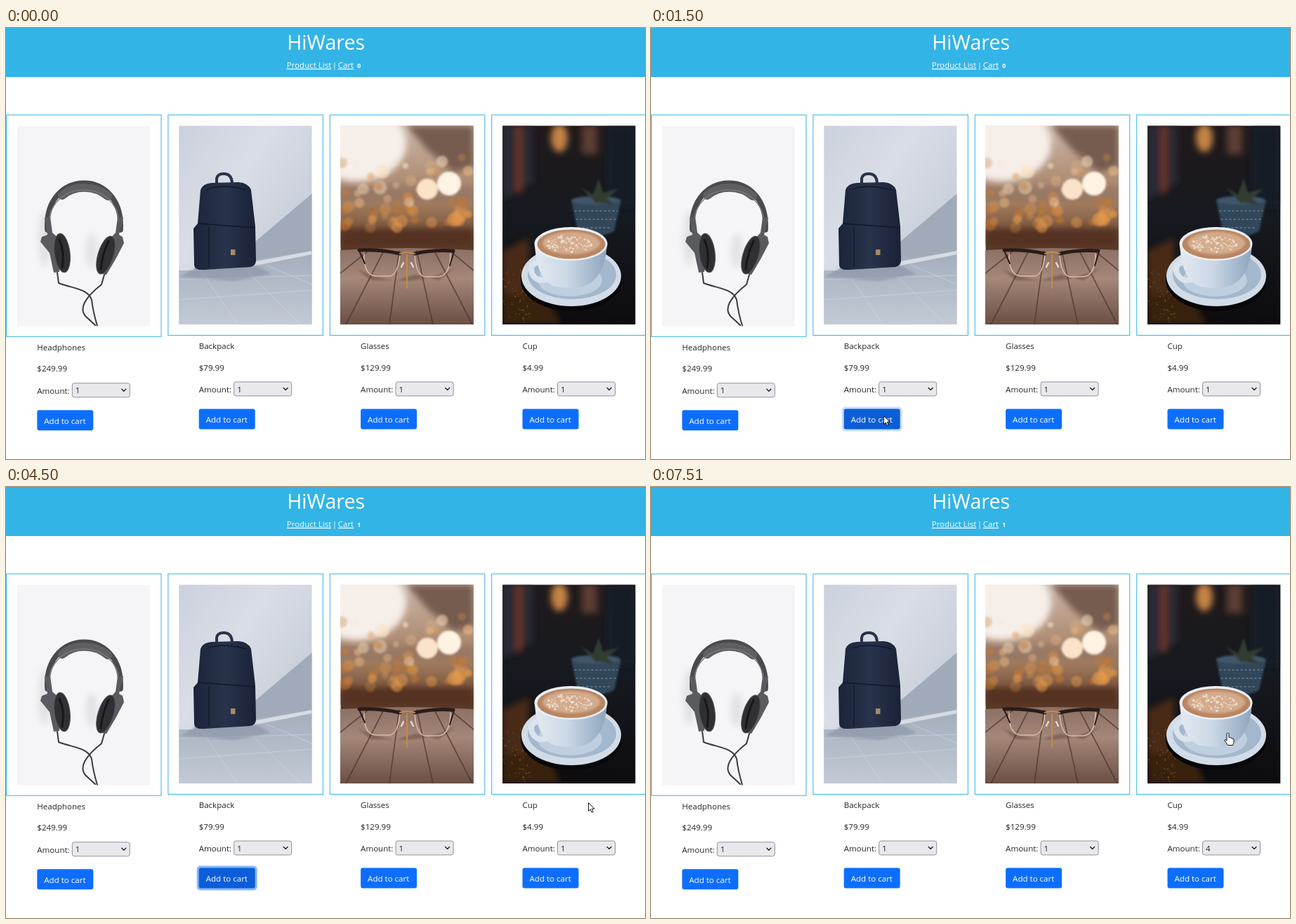
Write an HTML page that moves like this. It is 910 px wide and 615 px high and loops after 8000 ms.

```html
<!DOCTYPE html>
<html lang="en">
<head>
<meta charset="utf-8">
<title>HiWares</title>
<style>
  html, body { margin: 0; width: 100%; height: 100%; overflow: hidden; background: #fff; }
  svg { display: block; width: 910px; height: 615px; }
  text { font: 11.55px "Open Sans", "Noto Sans", sans-serif; fill: #212529; white-space: pre; }
  .head text { fill: #fff; }
  .head .title { font-size: 28.6px; }
  .head .count { font-size: 8.6px; font-weight: 700; }
  .link { text-decoration: underline; }
  .button { fill: #0d6efd; }
  .label { fill: #fff; }
  .dialog text { font-size: 8.7px; fill: #fbfbfe; }
  .dialog .strong { font-size: 8.5px; font-weight: 600; }
  .line { fill: none; stroke-linecap: round; stroke-linejoin: round; }
</style>
</head>
<body>
<svg id="stage" viewBox="0 0 910 615">
  <defs>
    <filter id="soft" x="-50%" y="-50%" width="200%" height="200%"><feGaussianBlur stdDeviation="5"/></filter>
    <filter id="slight" x="-50%" y="-50%" width="200%" height="200%"><feGaussianBlur stdDeviation="1.6"/></filter>
    <linearGradient id="wall" x2="1" y2="1"><stop stop-color="#cbd1dc"/><stop offset=".35" stop-color="#d9dde6"/><stop offset="1" stop-color="#bbc3d0"/></linearGradient>
    <linearGradient id="floor" x2="0" y2="1"><stop stop-color="#a3adbc"/><stop offset="1" stop-color="#c3cad5"/></linearGradient>
    <linearGradient id="fabric"><stop stop-color="#1b2439"/><stop offset=".5" stop-color="#28334c"/><stop offset="1" stop-color="#1a2236"/></linearGradient>
    <linearGradient id="dusk" x2="0" y2="1"><stop stop-color="#cdb7a8"/><stop offset=".4" stop-color="#a07a5c"/><stop offset=".62" stop-color="#5b3a28"/></linearGradient>
    <linearGradient id="deck" x2="0" y2="1"><stop stop-color="#8c7065"/><stop offset=".4" stop-color="#a58779"/><stop offset="1" stop-color="#6a4f45"/></linearGradient>
    <linearGradient id="night" x2="0" y2="1"><stop stop-color="#20191b"/><stop offset=".45" stop-color="#161a20"/><stop offset="1" stop-color="#0d0b0d"/></linearGradient>
    <linearGradient id="china"><stop stop-color="#e3e9f0"/><stop offset=".45" stop-color="#cbd8e6"/><stop offset="1" stop-color="#8ea4bd"/></linearGradient>
  </defs>

  <g class="head">
    <rect width="910" height="70" fill="#33b4e6"/>
    <text class="title" x="455.7" y="31" text-anchor="middle">HiWares</text>
    <text class="link" x="399.7" y="57">Product List</text>
    <text x="468" y="57" text-anchor="middle">|</text>
    <text class="link" x="472.7" y="57">Cart</text>
    <text class="count" id="count" x="500.3" y="57"></text>
  </g>
  <g id="cards"></g>

  <svg x="16" y="140" width="189" height="285.5" viewBox="16 140 189 285.5">
    <rect x="16" y="140" width="189" height="286" fill="#f5f5f7"/>
    <g filter="url(#soft)" fill="#d8d9dd" opacity=".7"><ellipse cx="55" cy="300" rx="9" ry="40"/><ellipse cx="122" cy="318" rx="8" ry="25"/></g>
    <g class="line">
      <path d="M59 288C53 200 168 198 163 288" stroke="#4a4a4e" stroke-width="7.500"/>
      <path d="M80 239C98 224 126 224 145 240" stroke="#5f5f63" stroke-width="12"/>
      <path d="M61 282C60 214 162 214 161 282" stroke="#77777b" stroke-width="1.500"/>
      <path d="M73 349L75 364C96 372 117 372 122 388Q124 405 130 425M140 352L136 366C112 385 104 400 113 411L127 424" stroke="#3a3a3e" stroke-width="2"/>
    </g>
    <path d="M55 270h8l3 22 9 8 1 48-8 1-6-28-13-16 2-7 8-3z" fill="#5a5b60"/>
    <path d="M167 270h-8l-3 22-8 9 2 24-13 26 6 1 13-22 12-23-2-9-5-3z" fill="#5a5b60"/>
    <g fill="#303034" stroke="#505056"><ellipse cx="80" cy="321" rx="11" ry="28" transform="rotate(-7 80 321)"/><ellipse cx="142" cy="324" rx="11" ry="28" transform="rotate(17 142 324)"/></g>
    <g class="line" stroke="#17171a" stroke-width="3"><path d="M76 302Q84 319 80 342M146 304Q137 323 135 344"/></g>
  </svg>

  <svg x="246.3" y="139.5" width="189.2" height="283.5" viewBox="246.3 139.5 189.2 283.5">
    <rect x="246" y="139" width="190" height="284" fill="url(#wall)"/>
    <path d="M436 236L350 309V338L436 322Z" fill="#a1aab9"/>
    <path d="M246 346L436 318V423H246Z" fill="url(#floor)"/>
    <path d="M246 338L268 337V346H246ZM350 334L436 318V323L350 340Z" fill="#d7dce4"/>
    <path class="line" d="M246 359L436 353M246 388L436 374M276 344L330 423M340 344L420 423M370 338L436 366" stroke="#dce0e7" opacity=".45"/>
    <path d="M270 342L356 339L378 351L325 361L248 355Z" fill="#7e899c" opacity=".5" filter="url(#slight)"/>
    <path class="line" d="M300 224V215Q301 208 310 208Q322 208 322 223" stroke="#283248" stroke-width="4"/>
    <path d="M277 231Q280 222 293 221L331 220Q345 221 349 231L355 283 356 332Q356 339 348 341L282 345Q268 346 268 338L267 286 273 279Z" fill="url(#fabric)"/>
    <path class="line" d="M274 279L354 285M287 230Q310 222 342 231M289 284V341" stroke="#111829" stroke-width="1.3"/>
    <rect x="320" y="316" width="6.5" height="8" fill="#a58a64"/>
  </svg>

  <svg x="476.7" y="139.5" width="189.2" height="283.5" viewBox="476.7 139.5 189.2 283.5">
    <rect x="476" y="139" width="190" height="284" fill="url(#dusk)"/>
    <g filter="url(#soft)">
      <ellipse cx="500" cy="165" rx="70" ry="54" fill="#f5eee9"/>
      <path d="M570 139H666V198L638 206 600 174Z" fill="#765b4f"/>
      <path d="M476 225H666V248H476Z" fill="#8f7467" opacity=".6"/>
      <path d="M476 286H666V312H476Z" fill="#543321"/>
    </g>
    <g id="bokeh" filter="url(#slight)"></g>
    <path d="M476 317Q570 311 666 317V423H476Z" fill="url(#deck)"/>
    <path class="line" d="M516 318L476 350M538 318L484 423M560 318L546 423M585 318L608 423M610 318L664 423M632 318L666 346" stroke="#4c342d" stroke-width="1.7" opacity=".7"/>
    <path d="M500 344Q570 378 640 342L616 360 584 352 556 360 520 360Z" fill="#49322b" opacity=".4" filter="url(#slight)"/>
    <g class="line" stroke="#2b1c19">
      <path d="M510 322Q509 352 526 354H546Q558 353 561 324M582 324Q584 353 597 355H616Q633 353 633 322" stroke="#d8bda7" stroke-width="1.5"/>
      <path d="M503 317Q534 316 561 322M582 322Q608 316 637 318" stroke-width="5"/>
      <path d="M503 318L511 336M638 319L632 339" stroke-width="2"/>
      <path d="M561 322Q571 318 582 322M571 324V371" stroke="#c58b46" stroke-width="2"/>
      <path d="M563 341L566 335M580 341L577 335" stroke="#e5d6ca" stroke-width="2.5"/>
    </g>
  </svg>

  <svg x="707.1" y="139.5" width="189.2" height="283.5" viewBox="707.1 139.5 189.2 283.5">
    <rect x="707" y="139" width="190" height="284" fill="url(#night)"/>
    <g filter="url(#soft)">
      <path d="M707 139H750V220L707 245Z" fill="#2a2b35"/>
      <path d="M726 139H735V235H726Z" fill="#6b3524"/>
      <ellipse cx="788" cy="157" rx="12" ry="20" fill="#c58345"/>
      <path d="M820 139H842V180H820Z" fill="#5c3c30"/>
      <path d="M855 139H897V255H855Z" fill="#171b26"/>
      <path d="M707 318L745 300 745 423H707Z" fill="#4a2a12"/>
      <path d="M707 380H770L790 423H707Z" fill="#38210f"/>
    </g>
    <g id="grain" fill="#a26c36"></g>
    <g filter="url(#slight)">
      <path d="M805 246H876L866 290Q840 303 814 289Z" fill="#33475a"/>
      <ellipse cx="840" cy="246" rx="35" ry="6" fill="#41566a"/>
      <path d="M840 250L818 227 836 238 844 215 850 235 873 229 856 243 868 253 844 249 822 254Z" fill="#313c31"/>
    </g>
    <path class="line" d="M810 261H871M812 273H868M815 285H863" stroke="#7c90a2" stroke-width="1.6" stroke-dasharray="2 4" opacity=".7"/>
    <ellipse cx="805" cy="360" rx="72" ry="44" fill="#070709"/>
    <ellipse cx="805" cy="354" rx="71" ry="43" fill="#d2dce7"/>
    <ellipse cx="806" cy="352" rx="63" ry="35" fill="#a3b7cd"/>
    <ellipse cx="803" cy="360" rx="46" ry="23" fill="#bfcfdf"/>
    <path class="line" d="M764 334Q744 334 749 350Q758 368 779 354" stroke="#dbe4ed" stroke-width="8"/>
    <path d="M753 309Q756 362 783 369Q808 374 827 367Q853 354 856 309Z" fill="url(#china)"/>
    <ellipse cx="804.500" cy="308" rx="52" ry="24" fill="#eaf0f5"/>
    <ellipse cx="805" cy="308.500" rx="48.500" ry="21" fill="#b98562"/>
    <ellipse cx="805" cy="307" rx="41" ry="16" fill="#d3ab8c" filter="url(#slight)"/>
    <g id="foam" fill="#f3e6d9"></g>
  </svg>

  <g id="modal">
    <rect width="910" height="615" fill="#1c1b22" opacity=".45"/>
    <g class="dialog">
      <rect x="300" y="293" width="312" height="101" rx="7" opacity=".45" filter="url(#slight)"/>
      <rect x="300.500" y="292" width="311" height="99.500" rx="5" fill="#42414d"/>
      <path class="line" d="M313.800 310.500a5.300 5.300 0 1 0 10.600 0a5.300 5.300 0 1 0-10.600 0h10.600M319.100 305.200q-5 5.300 0 10.600q5-5.300 0-10.600" stroke="#fbfbfe" stroke-width="1.200"/>
      <text class="strong" x="328" y="314">localhost:4200</text>
      <text x="313" y="340.500">Added to cart.</text>
      <rect id="ok" x="563" y="355" width="36.700" height="24.500" rx="3"/>
      <circle id="press" cx="581" cy="368" r="9" fill="#e4ec28" opacity=".75"/>
      <text class="strong" x="581.200" y="371" text-anchor="middle" style="fill:#2b2a33">OK</text>
    </g>
  </g>

  <g id="list"></g>
  <g stroke="#111" stroke-linejoin="round" fill="#fff">
    <path id="arrow" d="M.5.5V12.500L3.300 10 5.200 14.300 7.200 13.400 5.400 9.200H9Z"/>
    <path id="hand" d="M3 11V1.800Q3-.2 4.600 0T6 1.800V6.500Q8 5.500 8.800 7.300Q10.500 6.500 11 8.200Q13 7.500 13 9.800V13Q12.500 15.500 11.500 17.500H4.700Q2 14 .2 10.800Q0 8.800 1.500 9.300Z"/>
  </g>
</svg>

<script>
const $ = id => document.getElementById(id);
const show = (id, on) => $(id).style.display = on ? '' : 'none';
const place = (id, [x, y]) => $(id).setAttribute('transform', `translate(${x} ${y})`);

let seed = 7;
const random = () => (seed = seed * 16807 % 2147483647) / 2147483647;
const range = (a, b) => a + random() * (b - a);
const repeat = (n, make) => Array.from({ length: n }, (_, i) => make(i)).join('');

const products = [['Headphones', 249.99], ['Backpack', 79.99], ['Glasses', 129.99], ['Cup', 4.99]];
const PITCH = 230.4;

$('cards').innerHTML = products.map(([name, price], i) => {
  const x = PITCH * i, dy = i ? 0 : 1.8;
  return `
    <rect x="${x + .5}" y="124" width="220.5" height="${314.5 + dy}" fill="none" stroke="#33b4e6"/>
    <g transform="translate(${x + 44.3} ${dy})">
      <text y="458">${name}</text>
      <text y="488.500">$${price}</text>
      <text y="520">Amount:</text>
      <rect x="50" y="505" width="82" height="20" rx="3" fill="#e9e9ed" stroke="#8f8f9d"/>
      <text id="amount${i}" x="54.500" y="519.500">1</text>
      <path class="line" d="M120.500 513.500l3 3 3-3" stroke="#222" stroke-width="1.400"/>
      <rect id="ring${i}" x="-3" y="540.500" width="86" height="35" rx="5" fill="#86b7fe" style="display:none"/>
      <rect id="button${i}" class="button" y="543.500" width="80" height="29" rx="3"/>
      <text class="label" x="10" y="563">Add to cart</text>
    </g>`;
}).join('');

const lights = ['#e59a4c', '#fbe3c4', '#c9792f', '#f3c08a'];
$('bokeh').innerHTML = repeat(60, i => {
  const y = range(185, 285);
  return `<circle cx="${range(478, 664)}" cy="${y}" r="${range(4, 10)}"
    fill="${lights[y > 250 ? i % 2 * 2 : i % 4]}" opacity="${range(.2, .65)}"/>`;
}) + '<circle cx="631" cy="222" r="17" fill="#fff3e4"/><circle cx="600" cy="230" r="15" fill="#fbe3ca"/>';

$('grain').innerHTML = repeat(90, () =>
  `<circle cx="${range(707, 748)}" cy="${range(345, 423)}" r="${range(.4, 1)}" opacity="${range(.2, .7)}"/>`);

$('foam').innerHTML = repeat(110, () => {
  const angle = range(0, 2 * Math.PI), d = Math.sqrt(random());
  return `<circle cx="${803 + 34 * d * Math.cos(angle)}" cy="${308 + 12 * d * Math.sin(angle)}"
    r="${range(.5, 1.8)}" opacity="${range(.3, .9)}"/>`;
});

const ROW = 24, LIST_Y = 259;
$('list').innerHTML = `
  <rect x="787" y="257" width="82" height="248" rx="2" opacity=".2" filter="url(#slight)"/>
  <rect x="785.500" y="255.500" width="81" height="248" fill="#fff" stroke="#c4c4cc"/>
  <rect id="hover" x="786" width="80" height="${ROW}" fill="#0078d7"/>` +
  repeat(10, i => `<text id="option${i}" x="791" y="${LIST_Y + ROW * i + 16}">${i + 1}</text>`);

const BLUE = '#0d6efd', DARK = '#0b5ed7';
const steps = [
  { at: 0 },
  { at: 500, arrow: [369, 542] },
  { at: 1500, arrow: [331, 553], fill: DARK, ring: .45 },
  { at: 2500, arrow: [484, 424], fill: DARK, modal: true },
  { at: 3500, arrow: [582, 368], fill: DARK, modal: true, press: true },
  { at: 4500, arrow: [829, 450], fill: DARK, ring: 1, count: 1 },
  { at: 5510, arrow: [838, 509], fill: '#0c67ec', count: 1, option: 0 },
  { at: 6510, arrow: [822, 343], count: 1, option: 3 },
  { at: 7510, hand: [817, 351], count: 1, amount: 4 },
];

function draw(s) {
  $('count').textContent = s.count || 0;
  $('amount3').textContent = s.amount || 1;
  $('button1').style.fill = s.fill || BLUE;
  $('ring1').style.opacity = s.ring || 0;
  show('ring1', s.ring);
  show('modal', s.modal);
  show('press', s.press);
  $('ok').style.fill = s.press ? '#aaf2ff' : '#00ddff';
  show('list', s.option !== undefined);
  if (s.option !== undefined) {
    $('hover').setAttribute('y', LIST_Y + ROW * s.option);
    for (let i = 0; i < 10; i++) $('option' + i).style.fill = i === s.option ? '#fff' : '#15141a';
  }
  for (const id of ['arrow', 'hand']) {
    show(id, s[id]);
    if (s[id]) place(id, s[id]);
  }
}

const start = performance.now();
let current;
function tick(now) {
  const t = Math.max(0, now - start) % 8000;
  const step = steps.findLast(s => t >= s.at);
  if (step !== current) draw(current = step);
  requestAnimationFrame(tick);
}
tick(start);
</script>
</body>
</html>
```
